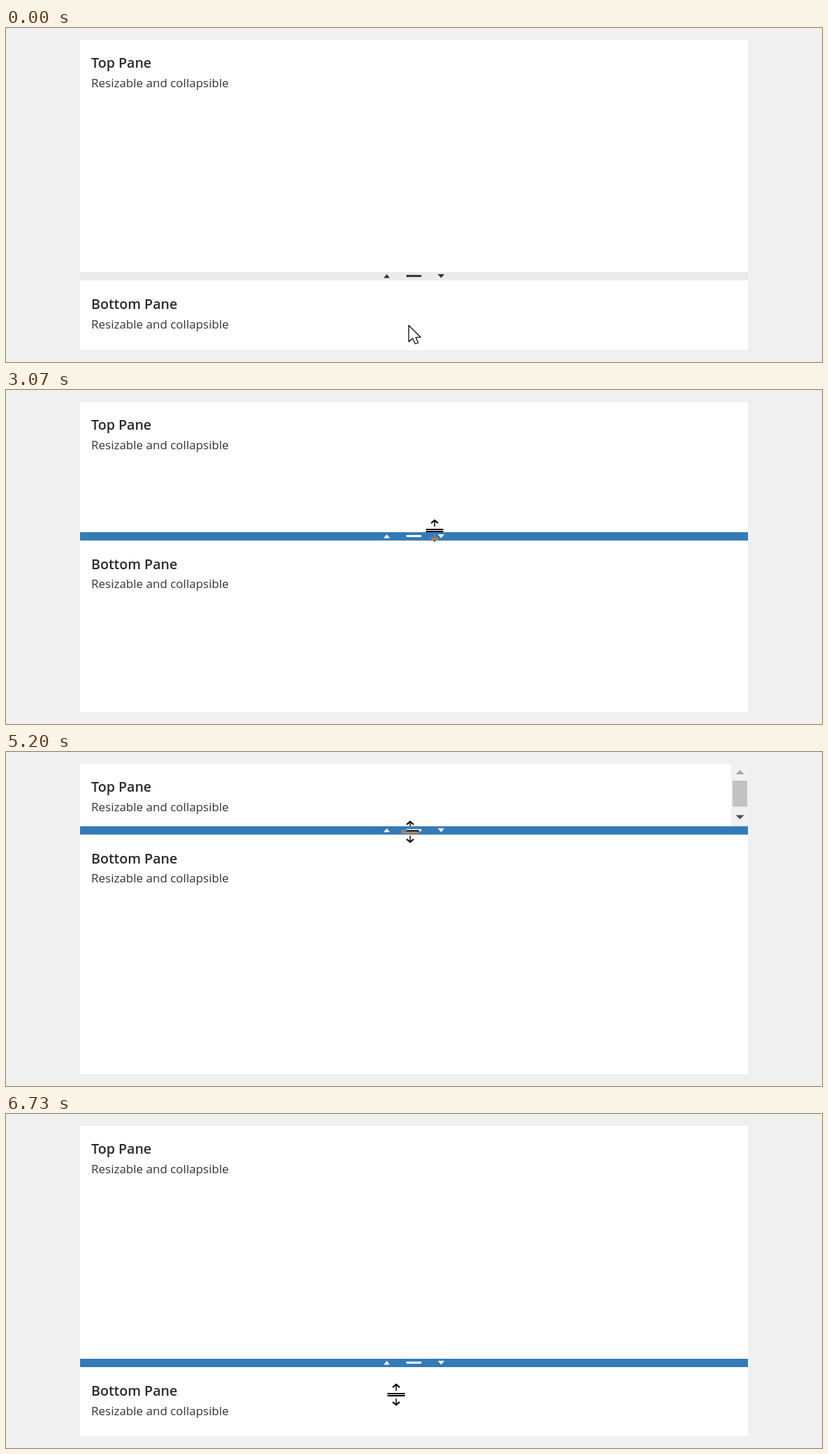
Write an HTML page that moves like this. It is 1168 by 479 pixels and loops after 9870 ms.

```html
<!DOCTYPE html>
<html lang="en">
<head>
<meta charset="utf-8">
<title>Splitter</title>
<style>
  html, body { margin: 0; width: 100%; height: 100%; overflow: hidden; background: #f0f0f0; }
  svg { display: block; }
  text { font-family: "Open Sans", "Noto Sans", sans-serif; font-size: 17px; fill: #333; }
  .title { font-size: 19.6px; font-weight: 600; fill: #2a2a2a; }
  .cursor { fill: #fff; stroke: #000; stroke-width: 1.2; stroke-linejoin: round; }
  #resize { mix-blend-mode: difference; fill: #fff; }
  #resize path { fill: none; stroke: #fff; }
</style>
</head>
<body>
<svg width="1168" height="479" viewBox="0 0 1168 479">
  <rect width="1168" height="479" fill="#f0f0f0"/>
  <rect x="106" y="17" width="956" height="445" fill="#fff"/>

  <text class="title" x="122" y="57">Top Pane</text>
  <text x="122" y="85">Resizable and collapsible</text>

  <g id="scrollbar">
    <rect id="track" x="1038" y="17" width="24" fill="#f1f1f1"/>
    <path d="M1044.5 32l6 -6l6 6Z" fill="#a3a3a3"/>
    <rect id="thumb" x="1040" y="41" width="21" fill="#c1c1c1"/>
    <path id="scrollDown" d="M1044.5 -16h12l-6 6Z" fill="#505050"/>
  </g>

  <g id="lower">
    <rect id="bar" x="106" width="956" height="12"/>
    <g id="icons" transform="translate(0 5.6)">
      <path d="M540.5 3l4.5 -5.5l4.5 5.5Z"/>
      <rect x="573" y="-1.5" width="21.5" height="3"/>
      <path d="M618 -2.5h9.500l-4.7 5.5Z"/>
    </g>
    <text class="title" x="122" y="53">Bottom Pane</text>
    <text x="122" y="80.5">Resizable and collapsible</text>
  </g>

  <path id="arrow" class="cursor" d="M0 0V23.5L5.5 18.5L9.5 26.5L13.5 25L10 17H17Z"/>
  <g id="hand">
    <g class="cursor" transform="translate(2 -.5)">
      <rect x="10" y="11" width="4" height="10" rx="2"/>
      <rect x="6" y="9.5" width="4" height="12" rx="2"/>
      <rect x="2" y="8" width="4" height="14" rx="2"/>
      <rect x="-2" width="4" height="22" rx="2"/>
      <path d="M-2 18L-6 14.5Q-11 13 -9.5 17L-.5 28V31H11.5V27Q14 25 14 19"/>
    </g>
  </g>
  <g id="resize">
    <rect x="-12.5" y="-2.5" width="25" height="2"/>
    <rect x="-12.5" y=".5" width="25" height="2"/>
    <path stroke-width="1.5" d="M0 -15V-5.5M0 15V5.5"/>
    <path stroke-width="2.2" d="M-5 -10.5l5 -4l5 4M-5 10.5l5 4l5 -4"/>
  </g>
</svg>
<script>
const LOOP = 9870, TICK = 1000 / 15;
const GRAB = 32, POINT = 65, LEAVE = 78;
const TOP_MIN = 106.5, TOP_REST = 350, TOP_MAX = 351;
const CONTENT_HEIGHT = 99.5;
const $ = id => document.getElementById(id);

// Times are in ticks: to the bar, dragging up, across the bar, dragging down.
const cursorMoves = [
  { start: 14, end: 24, x: 581.5, y: 357.5 },
  { start: 32.5, end: 61, x: 631.5, y: 114.5 },
  { start: 66, end: 78, x: 578.5, y: 114.5 },
  { start: 83.2, end: 101, x: 558.5, y: 402.5, power: 2 }
];

// The bar trails the cursor on both drags.
const barMoves = [
  { start: 34.4, end: 61, top: TOP_MIN },
  { start: 84, end: 96, top: TOP_MAX }
];

function easeOut(tick, { start, end, power = 1.6 }) {
  const u = Math.min(1, Math.max(0, (tick - start) / (end - start)));
  return 1 - (1 - u) ** power;
}

const follow = (moves, key, from, tick) =>
  moves.reduce((value, move) => value + (move[key] - value) * easeOut(tick, move), from);

const show = (id, on) => $(id).setAttribute("display", on ? "inline" : "none");
const place = (id, x, y) => $(id).setAttribute("transform", `translate(${x} ${y})`);
const toPixelCentre = value => Math.floor(value) + .5;

function drawScrollbar(top) {
  const height = top - 17, needed = height < CONTENT_HEIGHT;
  show("scrollbar", needed);
  if (!needed) return;
  $("track").setAttribute("height", height);
  $("thumb").setAttribute("height", (height - 48) * height / CONTENT_HEIGHT);
  place("scrollDown", 0, top);
}

function draw(now) {
  const tick = Math.floor((now % LOOP + 3.4) / TICK);
  const x = toPixelCentre(follow(cursorMoves, "x", 576.5, tick));
  const y = toPixelCentre(follow(cursorMoves, "y", 426.5, tick));
  const top = follow(barMoves, "top", TOP_REST, tick);

  const active = tick >= GRAB;
  const hover = y < TOP_REST + 12;
  $("bar").setAttribute("fill", active ? "#337ab7" : hover ? "#c1c1c1" : "#ebebeb");
  $("icons").setAttribute("fill", active ? "#fff" : "#333");
  place("lower", 0, top);
  drawScrollbar(top);

  const onButton = tick >= POINT && tick < LEAVE && x > 614;
  const kind = !active && !hover ? "arrow" : onButton ? "hand" : "resize";
  for (const id of ["arrow", "hand", "resize"]) show(id, id === kind);
  place(kind, x, y);
}

const start = performance.now();
function loop() {
  draw(performance.now() - start);
  requestAnimationFrame(loop);
}
loop();
</script>
</body>
</html>
```
